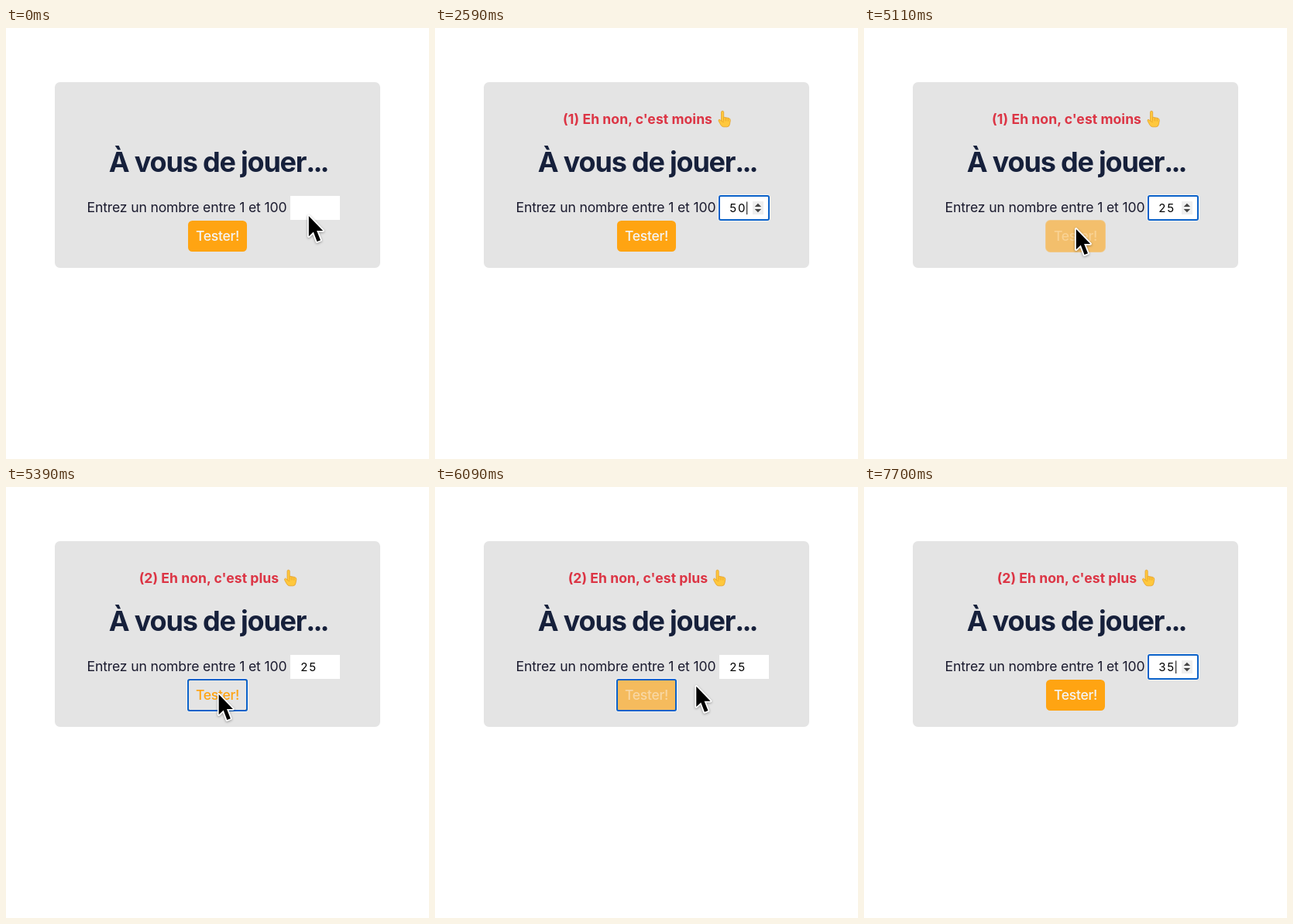
An HTML page for the animation above (8000 ms loop, 546 by 557 pixels).

```html
<!DOCTYPE html>
<html lang="fr">
<head>
<meta charset="utf-8">
<title>À vous de jouer</title>
<style>
html, body { margin: 0; width: 100%; height: 100%; overflow: hidden; background: #fff; }
svg { display: block; width: 546px; height: 557px; font-family: Inter, "Open Sans", sans-serif; }
text { white-space: pre; }
#msg { font-size: 17.6px; font-weight: 700; fill: #dc3545; letter-spacing: .03px; }
#title { font-size: 36px; font-weight: 700; fill: #16203b; letter-spacing: -1.2px; }
#dots { letter-spacing: -2.9px; }
#label { font-size: 17.6px; fill: #1a1a2e; letter-spacing: -.15px; }
#value { font-size: 15px; fill: #000; letter-spacing: 1.8px; }
#btnText { font-size: 17.6px; font-weight: 500; letter-spacing: -.3px; }
.cursor { fill: #000; stroke: #fff; paint-order: stroke; stroke-linejoin: round; filter: drop-shadow(0 1.5px 1.5px rgba(0,0,0,.35)); }
.halo { fill: none; stroke: #fff; stroke-width: 1; stroke-opacity: .65; }
.ring { fill: none; stroke: #0a61c9; stroke-width: 2; }
</style>
</head>
<body>
<svg viewBox="0 0 546 557">
  <rect x="63" y="70" width="420" height="240" rx="6.5" fill="#e4e4e4"/>
  <g id="notice">
    <text id="msg" y="124"></text>
    <g id="hand" stroke="#e39a1f" stroke-width=".7" stroke-linejoin="round">
      <path fill="#ffc83d" d="M4 1.8Q4 .2 5.6.2T7.2 1.8V8.2L13.6 9.4Q16 10 15.8 12.6L15 17Q14.6 20.8 11.4 20.8H7Q4.8 20.8 3.2 18L.7 13.4Q-.1 11.6 1.5 11L4 13Z"/>
      <path fill="none" d="M7.2 8.2V13M10 9V13.4M12.8 9.4V13.6M4 13Q5.8 15 7.6 14.2"/>
    </g>
  </g>
  <text id="title" x="132.8" y="186">À vous de jouer<tspan id="dots">...</tspan></text>
  <text id="label" x="104.5" y="238">Entrez un nombre entre 1 et 100</text>

  <rect x="367" y="217" width="64" height="31" fill="#fff"/>
  <g id="inputRing">
    <rect class="halo" x="365.5" y="215.5" width="67" height="34" rx="3.5"/>
    <rect class="ring" x="367" y="217" width="64" height="31" rx="2"/>
  </g>
  <text id="value" x="380.2" y="238"></text>
  <rect id="caret" y="224.5" width="1" height="16.5" fill="#000"/>
  <g id="spin">
    <rect x="410" y="224" width="14" height="17" fill="#efefef"/>
    <path fill="#444" d="M412.7 231L416.9 226.8L421.1 231ZM412.7 234L416.9 238.2L421.1 234Z"/>
  </g>

  <rect id="btnEdge" x="234" y="248" width="78" height="42" rx="6.5" fill="#ffa412"/>
  <rect id="btn" x="235" y="249" width="76" height="40" rx="5.5"/>
  <text id="btnText" x="245" y="275">Tester!</text>
  <g id="btnRing">
    <rect class="halo" x="233.5" y="247.5" width="79" height="43" rx="3.5"/>
    <rect class="ring" x="235" y="249" width="76" height="40" rx="2"/>
  </g>

  <path id="arrow" class="cursor" stroke-width="3.6" d="M.3 1V27.2L6.3 21.6L11 34L15.5 32.2L10.6 20H18.6Z"/>
  <g id="beam" class="cursor">
    <path fill="none" stroke-width="5" stroke-linecap="round" d="M-8-17Q-1.5-17 0-12.5Q1.5-17 8-17M0-12.5V12.5M-4 1H4M-8 17Q-1.5 17 0 12.5Q1.5 17 8 17"/>
    <path fill="none" stroke="#000" stroke-width="2.3" d="M-8-17Q-1.5-17 0-12.5Q1.5-17 8-17M0-12.5V12.5M-4 1H4M-8 17Q-1.5 17 0 12.5Q1.5 17 8 17"/>
  </g>
</svg>
<script>
const LOOP = 8000, TICK = 70;
const $ = id => document.getElementById(id);
const show = (id, on) => $(id).setAttribute('visibility', on ? 'visible' : 'hidden');
const clamp = v => Math.max(0, Math.min(1, v));
const within = (t, spans) => spans.some(([a, b]) => t >= a && t < b);

// [time, state] tables: a state holds until the next row
const values = [[0, ''], [1330, '5'], [1540, '50'], [3080, '5'], [4130, ''], [4480, '2'],
  [4550, '25'], [7280, '2'], [7420, ''], [7560, '3'], [7700, '35']];
const notices = [[0, null],
  [2030, { text: "(1) Eh non, c'est moins", x: 165, hand: 365.5 }],
  [5390, { text: "(2) Eh non, c'est plus", x: 171.7, hand: 359 }]];
const focuses = [[0, ''], [490, 'input'], [5390, 'btn'], [6580, 'input']];
const caretOn = [[490, 980], [1330, 2100], [2590, 3570], [4130, 5040], [6580, LOOP]];
const pointerOn = [[0, 1330], [4830, 7280]];
const hoverInput = [[140, 4830], [6300, LOOP]];
// [time, x, y]
const path = [[0, 390.5, 242], [70, 390.5, 242], [350, 392, 239], [4830, 392, 239], [5110, 273.5, 259],
  [5250, 274, 267], [5600, 275, 267], [5880, 304.5, 263.5], [6370, 387, 246.5], [6440, 388, 245], [6720, 391, 241]];

const at = (table, t) => table.filter(row => row[0] <= t).pop()[1];

function pointer(t) {
  const i = path.findIndex(p => p[0] > t);
  if (i < 0) return path[path.length - 1].slice(1);
  const [a, b] = [path[i - 1], path[i]];
  const k = (t - a[0]) / (b[0] - a[0]), e = k * k * (3 - 2 * k);
  return [1, 2].map(n => a[n] + (b[n] - a[n]) * e);
}

const mix = (a, b, k) => `rgb(${a.map((v, i) => Math.round(v + (b[i] - v) * k))})`;
const ORANGE = [255, 164, 18], GREY = [228, 228, 228], LIGHT = [244, 244, 244];

function draw(t) {
  const value = at(values, t), notice = at(notices, t), focus = at(focuses, t);

  show('notice', notice);
  if (notice) {
    $('msg').textContent = notice.text;
    $('msg').setAttribute('x', notice.x);
    $('hand').setAttribute('transform', `translate(${notice.hand} 107)`);
  }

  $('value').textContent = value;
  $('caret').setAttribute('x', 381 + value.length * 10.6);
  show('caret', within(t, caretOn));
  show('spin', focus === 'input' || within(t, hoverInput));
  show('inputRing', focus === 'input');
  show('btnRing', focus === 'btn');

  const hover = clamp((t - 4990) / 280) - clamp((t - 5910) / 280);
  $('btn').setAttribute('fill', mix(ORANGE, GREY, hover));
  $('btnText').setAttribute('fill', mix(LIGHT, ORANGE, hover));
  $('btnEdge').setAttribute('opacity', hover);

  const [x, y] = pointer(t), visible = within(t, pointerOn);
  const beam = t >= 140 && x > 367 && x < 431 && y < 248;
  show('arrow', visible && !beam);
  show('beam', visible && beam);
  for (const id of ['arrow', 'beam']) $(id).setAttribute('transform', `translate(${x} ${y})`);
}

const start = performance.now();
function frame() {
  const t = (performance.now() - start) % LOOP;
  draw(Math.floor(t / TICK) * TICK);
  requestAnimationFrame(frame);
}
frame();
</script>
</body>
</html>
```
